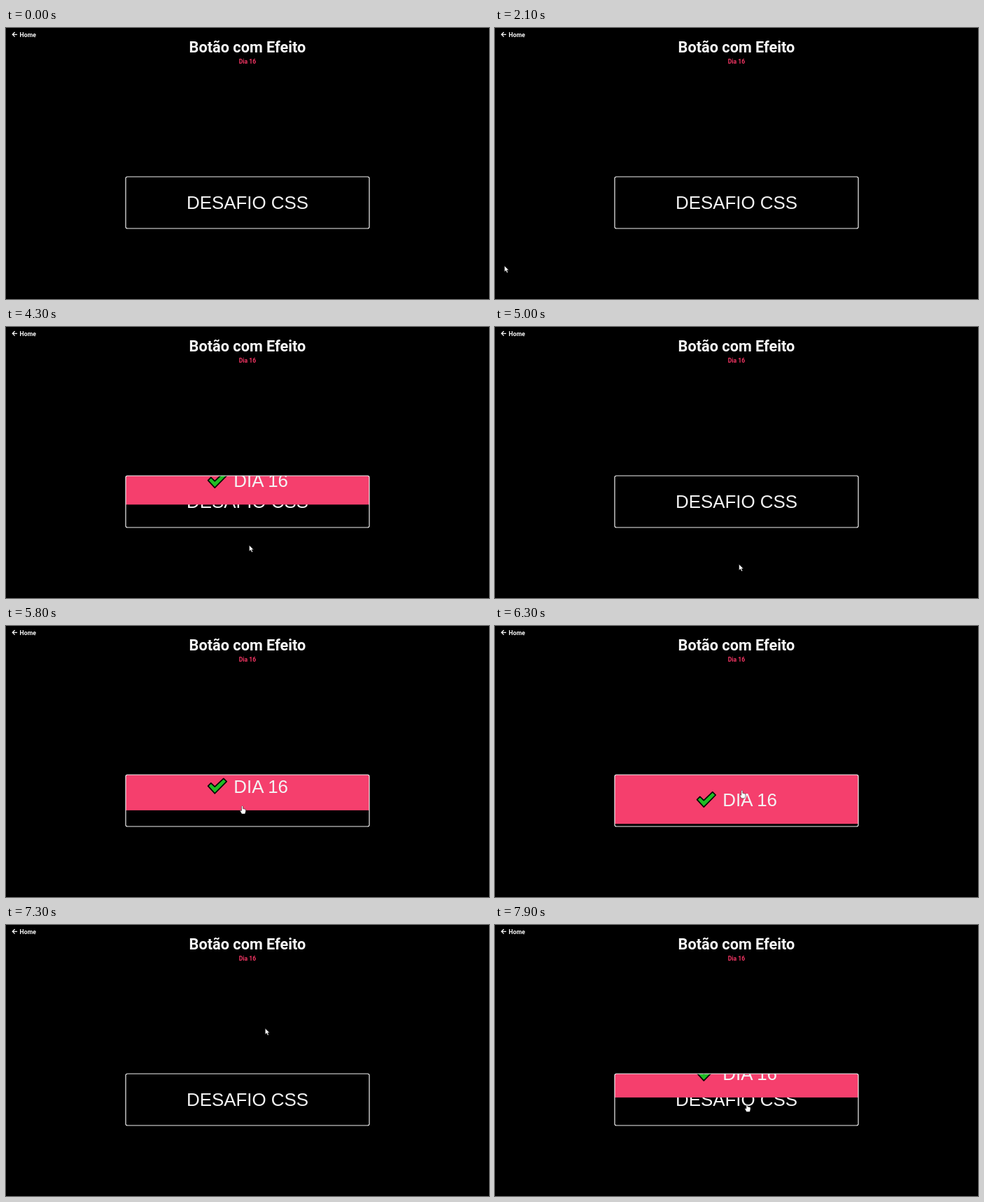
An HTML page that plays this animation: 690 by 388 pixels, repeating every 8 s.

```html
<!DOCTYPE html>
<html lang="pt">
<head>
<meta charset="utf-8">
<style>
html, body { margin: 0; width: 100%; height: 100%; overflow: hidden; background: #000; }
svg { display: block; width: 690px; height: 388px; }
.page { font-family: Roboto, sans-serif; font-weight: 700; fill: #f8f8f8; }
.label { font: 25.9px "Liberation Sans", Arial, sans-serif; fill: #f4f4f4; }
</style>
</head>
<body>
<svg viewBox="0 0 690 388">
  <defs>
    <clipPath id="inside"><rect x="171" y="213" width="348" height="74" rx="2"/></clipPath>
  </defs>
  <g class="page">
    <path d="M16 9.3H9.5M12.6 6 9.3 9.3l3.3 3.3" fill="none" stroke="#f8f8f8" stroke-width="1.3"/>
    <text x="19.6" y="12.5" font-size="8.7">Home</text>
    <text x="345" y="35.2" font-size="21.7" text-anchor="middle">Botão com Efeito</text>
    <text x="345" y="50.7" font-size="8.6" text-anchor="middle" fill="#f23563">Dia 16</text>
  </g>
  <g class="label" clip-path="url(#inside)">
    <text x="345" y="259.2" text-anchor="middle">DESAFIO CSS</text>
    <g id="cover">
      <rect x="171" y="213" width="348" height="70.3" fill="#f53f6d"/>
      <path d="M288.6 248.6l4.2-4.2 5.5 5.2 12.5-11.9 4.4 4.3-16.9 17.2Z"
            fill="#20bd25" stroke="#050505" stroke-width="1.7" stroke-linejoin="round"/>
      <text x="325.3" y="258">DIA 16</text>
    </g>
  </g>
  <rect x="171" y="213" width="348" height="74" rx="2.5" fill="none" stroke="#f0f0f0" stroke-width="1.2"/>
  <g id="cursor" fill="#fff" stroke="#111" stroke-width=".5" stroke-linejoin="round">
    <path id="arrow" d="M0 0V8.6L2 6.8 3.5 10 5 9.3 3.6 6.2H6.2Z"/>
    <path id="hand" d="M-1 1Q0-1 1 1V4L5 5V8L4 11.5H-.7L-3 7.6Q-3 6-1 7Z"/>
  </g>
</svg>
<script>
const LOOP = 8000, STEP = 100, FADE = 500, TRAVEL = 73.5;
const hovers = [[2700, 4178], [5580, 6645], [7752, LOOP]];
// Pointer turning points: time, x, y
const path = [
  [2100, 13.5, 340.5], [3200, 322, 257], [4100, 344, 278], [4300, 347.5, 312.5],
  [4900, 350, 350], [5800, 337.5, 257.5], [6600, 362, 222], [6800, 367.5, 160],
  [7200, 372, 130], [7900, 360, 256]
];
const el = id => document.getElementById(id);
const show = (id, on) => el(id).setAttribute("visibility", on ? "visible" : "hidden");
const move = (id, x, y) => el(id).setAttribute("transform", `translate(${x} ${y})`);

// CSS "ease": cubic-bezier(.25, .1, .25, 1)
function ease(t) {
  if (t <= 0) return 0;
  if (t >= 1) return 1;
  const curve = (u, a, b) => 3 * u * (1 - u) ** 2 * a + 3 * u * u * (1 - u) * b + u ** 3;
  let lo = 0, hi = 1;
  for (let i = 0; i < 24; i++) {
    const mid = (lo + hi) / 2;
    if (curve(mid, .25, .25) < t) lo = mid; else hi = mid;
  }
  return curve(lo, .1, 1);
}

function pointer(t) {
  const i = path.findIndex(p => p[0] >= t) || 1;
  const [t0, x0, y0] = path[i - 1], [t1, x1, y1] = path[i];
  const k = (t - t0) / (t1 - t0);
  return [x0 + (x1 - x0) * k, y0 + (y1 - y0) * k];
}

function draw() {
  const t = Math.floor(performance.now() % LOOP / STEP) * STEP;
  const open = hovers.reduce((sum, [on, off]) =>
    sum + ease((t - on) / FADE) - ease((t - off) / FADE), 0);
  const seen = t >= path[0][0];
  const over = hovers.some(([on, off]) => t >= on && t < off);
  move("cover", 0, (open - 1) * TRAVEL);
  if (seen) move("cursor", ...pointer(t));
  show("arrow", seen && !over);
  show("hand", seen && over);
  requestAnimationFrame(draw);
}
draw();
</script>
</body>
</html>
```
